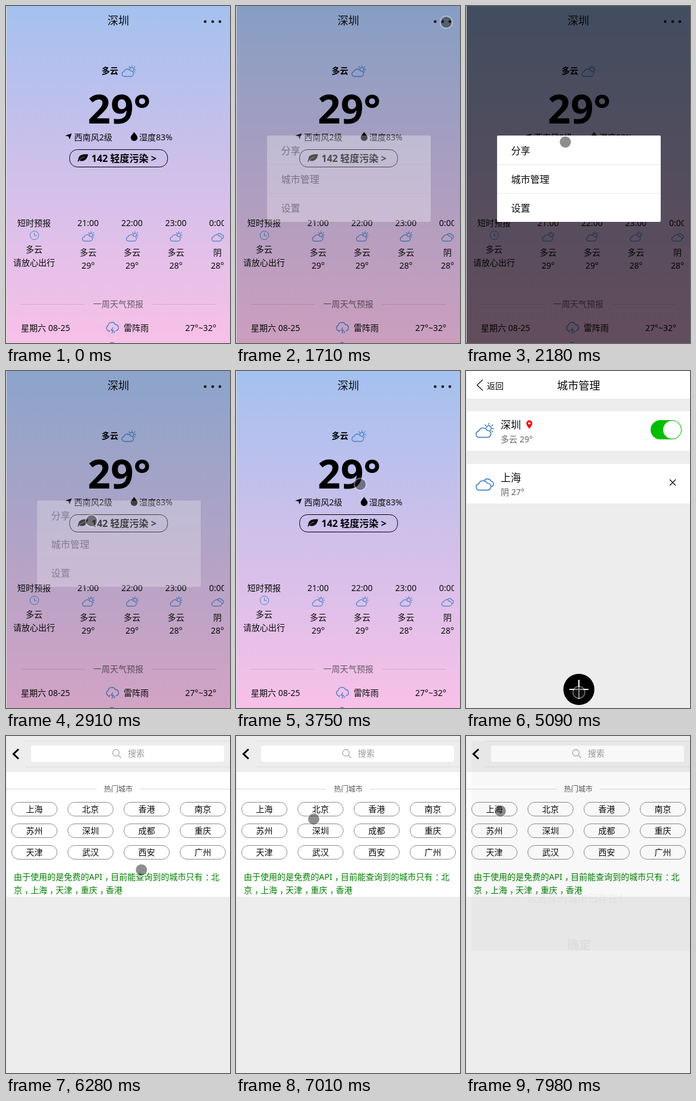
These frames come from a looping animation (375x562 px, 8000 ms). An HTML page:

```html
<!DOCTYPE html>
<html lang="zh-CN">
<head>
<meta charset="utf-8">
<style>
html, body { margin: 0; width: 100%; height: 100%; overflow: hidden; background: #ededed; }
svg { display: block; width: 375px; height: 562px; }
text { font-family: "Noto Sans", "Noto Sans CJK SC", "Noto Sans CJK", sans-serif; white-space: pre; }
</style>
</head>
<body>
<svg id="stage" viewBox="0 0 375 562" xmlns="http://www.w3.org/2000/svg"></svg>
<script>
const LOOP = 8000;
const BLUE = '#4683c6';

// ---- drawing helpers ----
const text = (x, y, size, str, o = {}) =>
  `<text x="${x}" y="${y}" font-size="${size}" fill="${o.fill || '#0b0b0b'}"` +
  ` text-anchor="${o.anchor || 'start'}" font-weight="${o.weight || 350}">${str}</text>`;
const mid = (x, y, size, str, o = {}) => text(x, y, size, str, { ...o, anchor: 'middle' });
const rect = (x, y, w, h, fill, extra = '') =>
  `<rect x="${x}" y="${y}" width="${w}" height="${h}" fill="${fill}" ${extra}/>`;
const line = (d, color, width = 1) =>
  `<path d="${d}" fill="none" stroke="${color}" stroke-width="${width}"/>`;
const dot = (x, y, r, fill) => `<circle cx="${x}" cy="${y}" r="${r}" fill="${fill}"/>`;
const shape = (d, fill) => `<path d="${d}" fill="${fill}"/>`;
const group = (id, body) => `<g id="${id}">${body}</g>`;

// ---- weather icons, each in a 24 x 20 box ----
const CLOUD = 'M4.8 18.5a4.1 4.1 0 0 1-.3-8.1a6 6 0 0 1 11-1a4.55 4.55 0 0 1 .8 9.1z';
const ICONS = {
  sunny: CLOUD + 'M14.4 6a3.3 3.3 0 1 1 5.2 3.3M17.8.2v1.6M12.8 2.2l1.1 1.1' +
    'M22.8 2.2l-1.1 1.1M24 7h-1.6M22.8 11.4l-1.1-1.1',
  overcast: CLOUD + 'M11.8 6a5 5 0 0 1 8.7.8a3.6 3.6 0 0 1 .4 7.1',
  thunder: 'M5 14.5a4.6 4.6 0 0 1-.4-8.7a6.2 6.2 0 0 1 11.8-1.6a5.2 5.2 0 0 1 1.6 10.2' +
    'M12.2 9.5l-2.6 4.3h3.6l-2.2 4.6M7.2 14l-1.2 2.4M15.6 15.5l-1.2 2.4'
};
const icon = (name, x, y, scale = 1, width = 1.3) =>
  `<path d="${ICONS[name]}" transform="translate(${x} ${y}) scale(${scale})" fill="none"` +
  ` stroke="${BLUE}" stroke-width="${width}" stroke-linecap="round" stroke-linejoin="round"/>`;

// ---- pages ----
function weatherPage() {
  const hours = [
    [137.5, '21:00', 'sunny', '多云', '29°'],
    [211, '22:00', 'sunny', '多云', '29°'],
    [284.5, '23:00', 'sunny', '多云', '28°'],
    [354, '0:00', 'overcast', '阴', '28°']
  ].map(([x, time, name, sky, temp]) =>
    mid(x, 367, 14, time) + icon(name, x - 10.5, 376, 0.87) +
    mid(x, 416, 14, sky) + mid(x, 438, 14, temp)).join('');
  return rect(1, 0, 374, 562, 'url(#sky)') +
    mid(188, 30.5, 18, '深圳') +
    [333.5, 346, 358].map(x => dot(x, 26, 2.2, '#000')).join('') +
    text(160, 113, 14, '多云', { weight: 700, fill: '#000' }) +
    icon('sunny', 193, 99) +
    mid(189.5, 195.5, 67, '29°', { weight: 700, fill: '#000' }) +
    shape('M110 212.5L106.5 222.5L104.6 217.6L99 216.3z', '#000') +
    text(114, 224, 14, '西南风2级') +
    shape('M214.5 210c2 3.5 5.7 6.2 5.7 9.6a5.7 5.4 0 0 1-11.4 0c0-3.4 3.7-6.1 5.7-9.6z', '#000') +
    text(223, 224, 14, '湿度83%') +
    rect(106.5, 239.5, 164, 29, 'none', 'rx="13" stroke="#000"') +
    shape('M137.5 247.5c-6-.6-16 0-16.3 7.7l-1.4 4.3h1.2l1.3-2c7 3.3 13.4-1 15.2-10z', '#000') +
    line('M122 257.5q4.5-5 9.5-6', '#c4c0e6', 0.7) +
    text(143, 260, 16, '142 轻度污染 &gt;', { weight: 600, fill: '#000' }) +
    mid(47, 367, 14, '短时预报') +
    `<circle cx="47.5" cy="382.5" r="7.2" fill="none" stroke="${BLUE}"/>` +
    line('M47.5 378v5h4', BLUE) +
    mid(47, 411, 14, '多云') + mid(47, 433, 14, '请放心出行') +
    `<g clip-path="url(#strip)">${hours}</g>` +
    line('M25 497.5H132M244 497.5H352', '#d3a8cb') +
    mid(188, 502, 14, '一周天气预报', { fill: '#6a5a68' }) +
    text(25, 542, 14, '星期六 08-25') +
    icon('thunder', 166.5, 527, 1, 1.4) +
    text(197, 542, 14, '雷阵雨') +
    text(352, 542, 14, '27°~32°', { anchor: 'end' }) +
    line('M174 563a3.8 3 0 0 1 7 0', BLUE, 1.2);
}

function menu() {
  return rect(52, 216, 274, 144, '#fff', 'rx="2"') +
    line('M52 264.5H326M52 312.5H326', '#ebebeb') +
    ['分享', '城市管理', '设置'].map((s, i) =>
      text(75.5, 246.5 + i * 48, 16, s)).join('');
}

function cityPage() {
  const row = (y, name, city, info) =>
    rect(1, y, 374, 66, '#fff') + icon(name, 15.5, y + 20, 1.28) +
    text(58, y + 29, 17, city) + text(58, y + 52, 14, info, { fill: '#666' });
  return rect(1, 0, 374, 562, '#ededed') + rect(1, 0, 374, 46, '#fff') +
    line('M28 14.5L18.5 23.5L28 32.5', '#000', 1.1) +
    text(35, 30, 14, '返回') + mid(188.5, 30.5, 18, '城市管理') +
    row(67, 'sunny', '深圳', '多云 29°') + row(155, 'overcast', '上海', '阴 27°') +
    shape('M106 96.5c-1.5-2.7-5-5.5-5-9.2a5 5 0 0 1 10 0c0 3.7-3.5 6.5-5 9.2z', '#f00') +
    dot(106, 87.3, 2, '#fff') +
    rect(309, 82, 52, 32, '#04be02', 'rx="16"') + dot(345, 98, 15, '#fff') +
    line('M341 181L351 191M351 181L341 191', '#000', 1.2) +
    dot(189, 531, 26, '#000') +
    line('M173 531H205M189 515V547', '#fff', 2);
}

function searchPage() {
  const cities = '上海 北京 香港 南京 苏州 深圳 成都 重庆 天津 武汉 西安 广州'.split(' ');
  const pills = cities.map((s, i) => {
    const x = 9 + (i % 4) * 94, y = 110 + Math.floor(i / 4) * 36;
    return rect(x + 0.5, y + 0.5, 76, 23, '#fff', 'rx="11.5" stroke="#8c8c8c"') +
      mid(x + 38.5, y + 17, 14, s);
  }).join('');
  // centred punctuation
  const note = (y, s) => text(13, y, 14,
    s.replace(/([，：])(.)/g, '<tspan dx="4">$1</tspan><tspan dx="-4">$2</tspan>'), { fill: '#008000' });
  return rect(1, 0, 374, 562, '#ededed') +
    line('M32 8.5H375M32 51.5H375', '#dedede') +
    line('M21 22L12.5 30L21 38', '#000', 3) +
    rect(42, 16, 323, 27, '#fff', 'rx="3"') +
    '<circle cx="184" cy="28" r="5.5" fill="none" stroke="#aaa" stroke-width="1.3"/>' +
    line('M188 32L192.5 36.5', '#aaa', 1.4) +
    text(204, 34, 14, '搜索', { fill: '#999' }) +
    rect(1, 60, 374, 208, '#fff') +
    line('M1 88.5H152M224 88.5H375', '#d9d9d9') +
    mid(188, 93, 12, '热门城市', { fill: '#555' }) + pills +
    note(240, '由于使用的是免费的API，目前能查询到的城市只有：北') +
    note(262, '京，上海，天津，重庆，香港');
}

function dialog() {
  return rect(9, 8, 366, 350, '#000', 'opacity=".028"') +
    '<g opacity=".04">' + mid(188.5, 243, 18, '提示') +
    mid(187, 277, 17, '您选择的城市已存在！') +
    mid(189, 356, 20, '确定', { weight: 700 }) + '</g>';
}

const stage = document.getElementById('stage');
stage.innerHTML = `<defs>
  <linearGradient id="sky" x1="0" y1="0" x2="0" y2="1">
    <stop offset="0" stop-color="#a4c1ef"/><stop offset=".5" stop-color="#d0c0ea"/>
    <stop offset="1" stop-color="#f8c0e8"/>
  </linearGradient>
  <clipPath id="strip"><rect x="90" y="340" width="275" height="120"/></clipPath>
</defs>` +
  rect(0, 0, 375, 562, '#e2e2e2') +
  group('weather', weatherPage()) +
  group('shade', rect(1, 0, 374, 562, '#000')) + group('menu', menu()) +
  group('city', cityPage()) + group('search', searchPage()) + group('dialog', dialog()) +
  group('touch', dot(0, 0, 9.5, 'rgba(30,30,30,.5)') +
    '<circle r="10" fill="none" stroke="#fff" stroke-opacity=".4" stroke-width="1.8"/>');

// ---- motion ----
const PATH = [ // time, x, y
  [640, 387, 78], [1180, 352, 27], [1800, 352, 27], [2180, 166.5, 226.5], [2410, 112, 292],
  [2430, 110, 294], [2680, 110, 294], [2910, 143, 250], [3190, 185, 205], [3390, 185, 205],
  [3750, 208, 189], [4160, 208, 189], [4300, 288, 163], [4360, 305, 175], [4500, 296, 260],
  [4660, 262, 390], [4860, 189, 541], [5080, 189, 541], [5090, 189, 536], [5150, 189.5, 531],
  [5330, 189.5, 530], [5650, 189.5, 530], [5950, 205, 380], [6280, 226.5, 223.5],
  [6440, 254, 198], [6650, 220, 162], [7220, 78, 125], [7250, 77, 128], [7470, 57.5, 125]
];
const clamp = v => Math.max(0, Math.min(1, v));
const ramp = (t, a, b) => clamp((t - a) / (b - a));

function touchAt(t) {
  const i = PATH.findIndex(p => p[0] > t);
  if (i === 0) return [-40, -40];
  if (i < 0) return PATH[PATH.length - 1].slice(1);
  const a = PATH[i - 1], b = PATH[i], k = ramp(t, a[0], b[0]);
  return [a[1] + (b[1] - a[1]) * k, a[2] + (b[2] - a[2]) * k];
}

const el = id => document.getElementById(id);
const show = (id, on) => el(id).style.display = on ? '' : 'none';

function render(t) {
  const fade = ramp(t, 1620, 1920) - ramp(t, 2680, 2990);
  show('weather', t < 3800);
  el('shade').setAttribute('opacity', fade * 0.6);
  el('menu').setAttribute('opacity', fade);
  show('city', t >= 3800 && t < 5610);
  show('search', t >= 5610);
  show('dialog', t >= 7980);
  const [x, y] = touchAt(t);
  el('touch').setAttribute('transform', `translate(${x.toFixed(1)} ${y.toFixed(1)})`);
}

const start = performance.now();
function tick() {
  render((performance.now() - start) % LOOP);
  requestAnimationFrame(tick);
}
tick();
</script>
</body>
</html>
```
